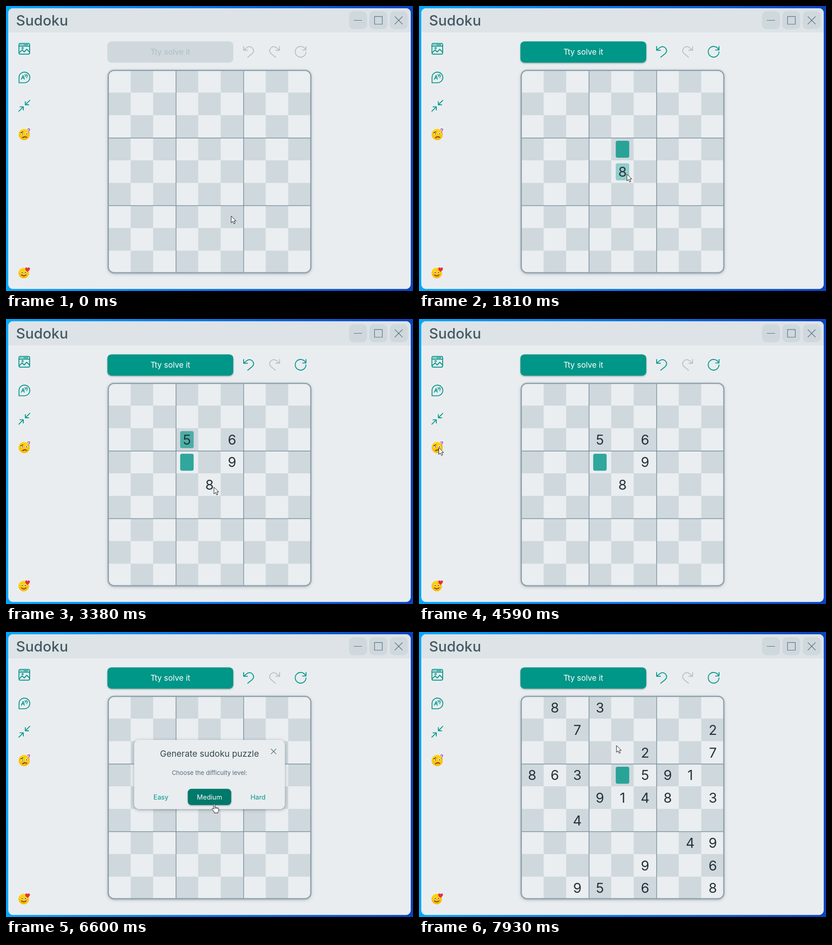
Recreate the animation shown at these times as an HTML page. Size 894x626 px, loop 7.99 s.

```html
<!DOCTYPE html>
<html lang="en">
<head>
<meta charset="utf-8">
<title>Sudoku</title>
<style>
  html, body { margin: 0; width: 100%; height: 100%; overflow: hidden; background: #0a6cf0; }
  svg { display: block; width: 100%; height: 100%; }
  text { font-family: Inter, Roboto, sans-serif; user-select: none; }
  .mid { text-anchor: middle; }
  .digit { font-size: 30px; fill: #263238; text-anchor: middle; }
  .line { fill: none; stroke-width: 1.9; stroke-linecap: round; stroke-linejoin: round; }
  .teal { stroke: #009688; }
  .thin { fill: none; stroke: #546e7a; stroke-width: 1.2; }
  .choice { font-size: 14.6px; fill: #009688; text-anchor: middle; }
</style>
</head>
<body>
<svg viewBox="0 0 894 626" xmlns="http://www.w3.org/2000/svg">
  <defs>
    <linearGradient id="desk">
      <stop offset="0" stop-color="#00a8fb"/>
      <stop offset=".45" stop-color="#0a78ec"/>
      <stop offset="1" stop-color="#0a44c0"/>
    </linearGradient>
    <linearGradient id="gold" x1="0" y1="0" x2="0" y2="1">
      <stop offset="0" stop-color="#ffd803"/>
      <stop offset="1" stop-color="#fdb50f"/>
    </linearGradient>
    <filter id="soft" x="-10%" y="-10%" width="120%" height="125%">
      <feDropShadow dx="0" dy="1.5" stdDeviation="3" flood-color="#37474f" flood-opacity=".5"/>
    </filter>
    <filter id="low" x="-10%" y="-20%" width="120%" height="160%">
      <feDropShadow dx="0" dy="1.5" stdDeviation="1.5" flood-color="#263238" flood-opacity=".4"/>
    </filter>
    <clipPath id="round"><rect x="224.5" y="141.5" width="445" height="444.5" rx="13"/></clipPath>
    <clipPath id="win"><rect x="5" y="5" width="884" height="616.5" rx="10"/></clipPath>
  </defs>

  <rect width="894" height="626" fill="url(#desk)"/>
  <g clip-path="url(#win)">
    <rect x="5" y="5" width="884" height="617" fill="#e9edf0"/>
    <rect x="5" y="5" width="884" height="53" fill="#dde3e6"/>
  </g>
  <text x="22" y="42.5" font-size="31.5" font-weight="500" fill="#455a64">Sudoku</text>

  <g fill="#cfd8dd">
    <rect x="753.5" y="11.5" width="39.5" height="39.5" rx="10"/>
    <rect x="798" y="11.5" width="39.5" height="39.5" rx="10"/>
    <rect x="843" y="11.5" width="39.5" height="39.5" rx="10"/>
  </g>
  <path class="thin" d="M764 31.5H782M809.5 23.2H826.5V40H809.5ZM854 23L871 40M871 23L854 40"/>

  <circle id="halo" cx="40.3" cy="282" r="26.7" fill="#c3d8db"/>

  <g class="line teal">
    <rect x="28.4" y="82.2" width="23.6" height="23.6" rx="3"/>
    <path d="M28.4 88.2H52M32 85.2h.1M35 85.2h.1M38.5 85.2H48M29 102.5L35.5 96.5L40 101L45.5 95L52 101.5"/>
    <circle cx="36.5" cy="92.6" r="1.6" stroke-width="1.5"/>
    <path d="M28.6 168.6V157A11.9 11.7 0 1 1 40.5 168.6Z"/>
    <path stroke-width="1.7" d="M33.6 161L37.6 152.4L40.2 161M35.2 158.2H39.6"/>
    <path stroke-width="1.4" d="M40.8 151.3H43.8L41.8 155.5M45.8 149.8V158M45.8 153.4H48"/>
    <path d="M52.3 207.2L42.5 217M42.5 210V217H49.8M28.2 231.2L38 221.4M30.8 221.4H38V228.6"/>
  </g>

  <g>
    <circle cx="40" cy="282.3" r="12.3" fill="url(#gold)"/>
    <g fill="#fff"><circle cx="36" cy="280.8" r="2.5"/><circle cx="45" cy="280.6" r="2.5"/></g>
    <g fill="#3e2b20"><circle cx="36.4" cy="281" r="1.3"/><circle cx="45.2" cy="280.8" r="1.3"/></g>
    <path class="line" stroke="#5b3a12" stroke-width="1.4" d="M36.5 289.3Q41 285.6 45.5 288.6M32.6 278.6L37 276.6"/>
    <path class="line" stroke="#b552d8" stroke-width="1.7" d="M47.8 271.2Q48.4 269.4 50.6 269.7Q53.2 270.7 51.5 272.8Q50 274 50.2 275.2M50.1 278.1V278.2"/>
  </g>
  <g>
    <circle cx="39" cy="586.6" r="11.6" fill="url(#gold)"/>
    <g fill="#fff"><circle cx="35.2" cy="585" r="2.3"/><circle cx="42.8" cy="585" r="2.3"/></g>
    <g fill="#3e2b20"><circle cx="35.4" cy="585.2" r="1.3"/><circle cx="42.8" cy="585.2" r="1.3"/></g>
    <path class="line" stroke="#5b3a12" stroke-width="1.4" d="M34 590.6Q39 595 44 590.6"/>
    <path fill="#e5303d" d="M47.2 584C43.5 581.2 41.6 579 42.2 576.6C43.2 573.6 46.4 573.9 47.3 575.9C48.9 573.2 52.2 573.7 52.6 576.6C52.8 579.4 50.4 582 47.2 584Z"/>
  </g>

  <rect id="solve" x="222.7" y="77.7" width="276.6" height="46.8" rx="9"/>
  <text id="solveText" class="mid" x="361" y="107.2" font-size="17.2">Tty solve it</text>
  <g class="line" stroke-width="2.1">
    <path id="undo" d="M522 89V97.3H530.3M522.4 97L528.3 91.9Q535 86.8 541 91.9Q546.8 98.2 541.2 104.2L531 112.6"/>
    <path stroke="#b4c0c6" transform="translate(1123 0) scale(-1 1)" d="M522 89V97.3H530.3M522.4 97L528.3 91.9Q535 86.8 541 91.9Q546.8 98.2 541.2 104.2L531 112.6"/>
    <path id="reset" d="M659 89V96.6H651.4M658.2 96.5A11.8 11.8 0 1 0 658.9 101"/>
  </g>

  <rect x="224.5" y="141.5" width="445" height="444.5" rx="13" fill="#eaeef1" filter="url(#soft)"/>
  <g id="cells" clip-path="url(#round)" fill="#cfd8dd"></g>
  <path fill="none" stroke="#78909c" stroke-width="1.5" d="M373.5 142V585M522 142V585M225 290H669M225 438.6H669"/>
  <rect x="224.6" y="141.3" width="445" height="444.6" rx="13" fill="none" stroke="#90a4ae" stroke-width="2.8"/>
  <g id="marks" fill="#009688">
    <rect width="29.6" height="37.4" rx="4"/>
    <rect width="29.6" height="37.4" rx="4"/>
  </g>
  <g id="digits"></g>

  <g id="dialog">
    <rect x="281.5" y="237" width="331" height="152" rx="11" fill="#e9edf0" filter="url(#soft)"/>
    <text class="mid" x="447" y="273.8" font-size="18.9" fill="#37474f">Generate sudoku puzzle</text>
    <path class="thin" d="M582 256.5L593.5 268M593.5 256.5L582 268"/>
    <text class="mid" x="447" y="314" font-size="13.2" fill="#546e7a">Choose the difficulty level:</text>
    <rect id="medium" x="399.3" y="344.6" width="95.4" height="35.4" rx="8" filter="url(#low)"/>
    <text class="choice" x="340.3" y="367.6">Easy</text>
    <text class="choice" x="447" y="367.6" style="fill:#fff">Medium</text>
    <text class="choice" x="553.5" y="367.6">Hard</text>
  </g>

  <g id="cursor" fill="#fff" stroke="#111" stroke-width="1" stroke-linejoin="round">
    <path id="arrow" d="M0 .4V15.2L3.5 12L5.9 17.4L8.4 16.3L6.1 11H10.6Z"/>
    <path id="hand" d="M-1.5 11V1.2a1.5 1.5 0 0 1 3 0V7.2q1.4-1 2.8 .5 1.6-.8 2.7 .6 2.4-.6 2.5 1.9v3.3q0 2-1.5 4V19.5h-8v-2.2l-4.2-5.2q-1.4-1.8-.2-2.6 1.4-.6 3.4 1.5ZM1.5 7.2V10.5M4.3 7.8V10.5M7 8.4V10.7"/>
  </g>
</svg>
<script>
const LOOP = 7990;
const PITCH = 49.6;
const $ = id => document.getElementById(id);
const clamp = v => Math.max(0, Math.min(1, v));
const span = (t, a, b) => clamp((t - a) / (b - a));
const cx = c => 248.6 + PITCH * c;
const cy = r => 165.7 + PITCH * r;

const puzzle = [
  '.8.3.....', '..7.....2', '.....2..7',
  '863..591.', '...9148.3', '..4......',
  '.......49', '.....9..6', '..95.6..8'
];

// time, row, column, digit
const typed = [[1390, 4, 4, 8], [2110, 3, 5, 9], [2410, 2, 5, 6], [3020, 2, 3, 5]];

// time, row, column of the selected cell
const picks = [
  [850, 4, 4], [1750, 3, 4], [1930, 3, 5], [2290, 2, 5],
  [2600, 2, 4], [2790, 2, 3], [3375, 3, 3], [7790, 3, 4]
];

// start, end, points the pointer passes through
const moves = [
  [260, 870, [[494.7, 461], [463, 447], [409, 394], [456.8, 369]]],
  [3890, 4700, [[456.8, 369], [210, 300], [2, 262], [50.5, 285]]],
  [5720, 6350, [[50.5, 285], [180, 318], [300, 344], [457.5, 378]]],
  [6980, 7790, [[457.5, 378], [488, 450], [400, 534], [260, 455], [350, 340], [438.5, 308]]],
  [7825, 7925, [[438.5, 308], [433.8, 249]]]
];

function makeBoard() {
  let cells = '', digits = '';
  for (let r = 0; r < 9; r++) for (let c = 0; c < 9; c++) {
    if ((r + c) % 2) {
      cells += `<rect x="${224.4 + 49.45 * c}" y="${140.6 + 49.6 * r}" width="49.4" height="49.6"/>`;
    }
    digits += `<text class="digit" x="${cx(c)}" y="${cy(r) + 10.8}"></text>`;
  }
  $('cells').innerHTML = cells;
  $('digits').innerHTML = digits;
}

function spline(points, u) {
  const n = points.length - 1;
  const i = Math.min(n - 1, Math.floor(u * n));
  const k = u * n - i;
  const at = j => points[Math.max(0, Math.min(n, j))];
  const [a, b, c, d] = [at(i - 1), at(i), at(i + 1), at(i + 2)];
  return [0, 1].map(m => b[m] + k / 2 * (c[m] - a[m]
    + k * (2 * a[m] - 5 * b[m] + 4 * c[m] - d[m]
    + k * (3 * (b[m] - c[m]) + d[m] - a[m]))));
}

function pointer(t) {
  const [start, end, points] = moves.filter(m => t >= m[0]).pop() || moves[0];
  const u = span(t, start, end);
  return spline(points, u * u * (3 - 2 * u));
}

function digitAt(t, r, c) {
  if (t >= 6720) return puzzle[r][c].replace('.', '');
  const hit = typed.find(d => t >= d[0] && d[1] === r && d[2] === c);
  return hit ? String(hit[3]) : '';
}

function place(mark, pick, opacity) {
  mark.setAttribute('opacity', opacity);
  if (!pick) return;
  mark.setAttribute('x', cx(pick[2]) - 14.8);
  mark.setAttribute('y', cy(pick[1]) - 18.6);
}

const show = (id, on) => $(id).setAttribute('display', on ? 'inline' : 'none');

makeBoard();
const labels = [...$('digits').children];
const [now, before] = $('marks').children;

function draw(t) {
  labels.forEach((el, i) => {
    const s = digitAt(t, Math.floor(i / 9), i % 9);
    if (el.textContent !== s) el.textContent = s;
  });

  const n = picks.filter(p => t >= p[0]).length;
  const pick = picks[n - 1], last = picks[n - 2];
  place(now, pick, pick ? 0.8 : 0);
  place(before, last, last ? 0.66 * (1 - span(t, pick[0], pick[0] + 140)) : 0);

  const active = t >= 1390;
  const tone = active ? '#009688' : '#b4c0c6';
  $('solve').setAttribute('fill', active ? '#009688' : '#cfd8dd');
  $('solve').setAttribute('filter', active ? 'url(#low)' : 'none');
  $('solveText').setAttribute('fill', active ? '#fff' : '#b0bec5');
  $('undo').setAttribute('stroke', tone);
  $('reset').setAttribute('stroke', tone);

  $('halo').setAttribute('opacity', span(t, 4730, 5010) * (1 - span(t, 5460, 5580)));
  show('dialog', t >= 5380 && t < 6720);
  const over = t >= 6300 && t < 6720;
  $('medium').setAttribute('fill', over ? '#00796b' : '#009688');

  const [x, y] = pointer(t);
  $('cursor').setAttribute('transform', `translate(${x} ${y})`);
  show('arrow', !over);
  show('hand', over);
}

const origin = performance.now();
function tick() {
  draw((performance.now() - origin) % LOOP);
  requestAnimationFrame(tick);
}
draw(0);
requestAnimationFrame(tick);
</script>
</body>
</html>
```
